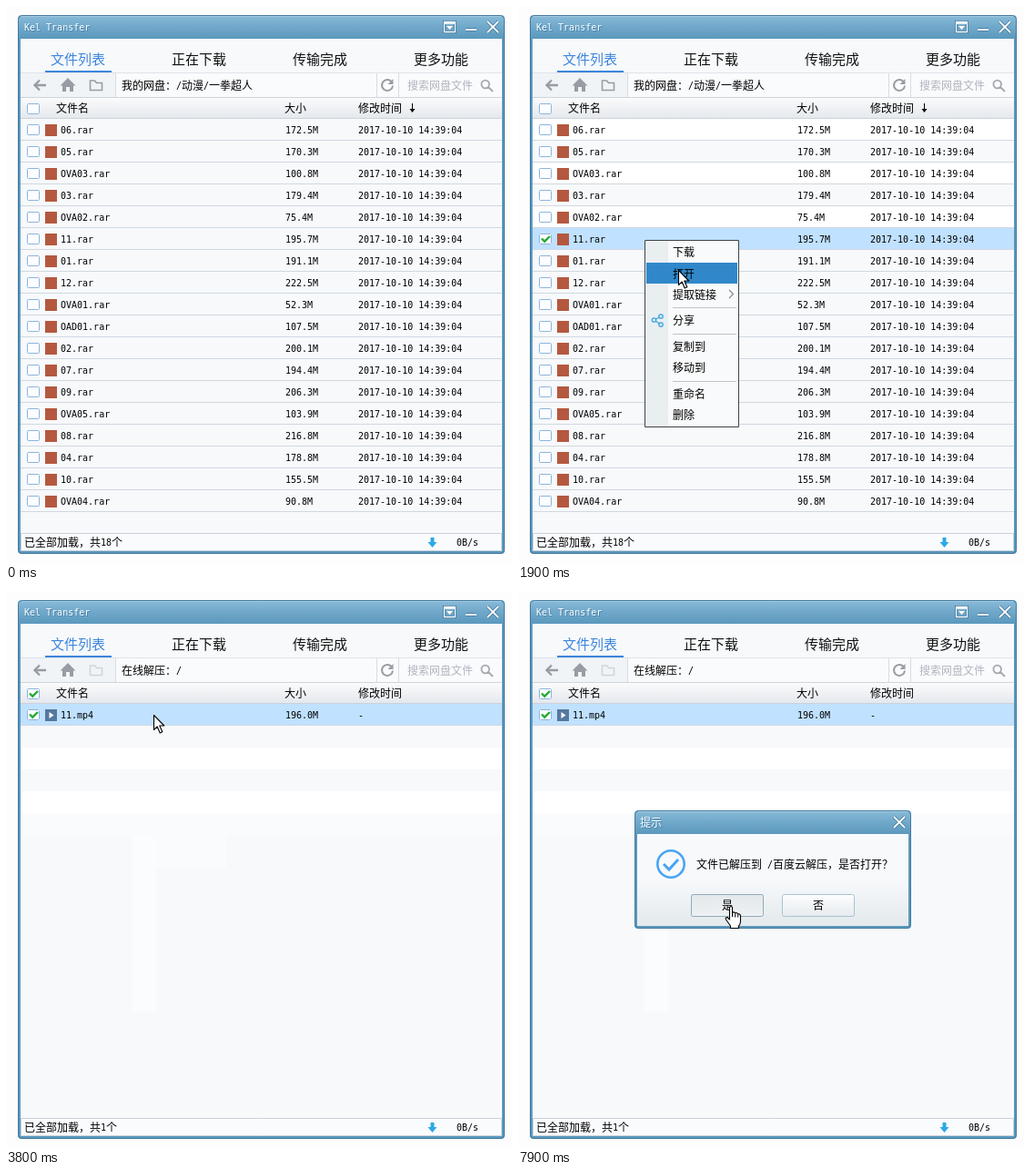
Write an HTML page with a canvas that moves like this. It is 556 px wide and 612 px high and loops after 8 s.

```html
<!DOCTYPE html>
<html lang="zh-CN">
<head>
<meta charset="utf-8">
<title>Kel Transfer</title>
<style>
html, body { margin: 0; width: 100%; height: 100%; overflow: hidden; background: #fdfdfd; }
canvas { display: block; }
</style>
</head>
<body>
<canvas id="stage" width="556" height="612"></canvas>
<script>
const ctx = document.getElementById('stage').getContext('2d');
const LOOP = 8000, STEP = 100;
const ROW_TOP = 124, ROW_H = 24, PICKED = 5;
const SELECTED = '#c0e1ff', HOVER = '#dceeff', PAGE = '#f7f9fb', GREY = '#989da4', BLUE = '#3c86dc';

const files = `06 172.5,05 170.3,OVA03 100.8,03 179.4,OVA02 75.4,11 195.7,01 191.1,12 222.5,OVA01 52.3,
OAD01 107.5,02 200.1,07 194.4,09 206.3,OVA05 103.9,08 216.8,04 178.8,10 155.5,OVA04 90.8`
  .split(',').map(entry => entry.trim().split(' '));

// Pointer keys: time, x, y
const pointerKeys = [
  [200, 350, 77], [400, 289, 138], [600, 212, 178], [800, 164, 225], [1000, 139, 257], [1200, 139, 257],
  [1900, 176, 290], [2900, 176, 290], [3100, 160, 196], [3200, 156, 150], [3400, 158, 141], [3500, 158, 141],
  [3800, 162, 136], [4000, 162, 136], [4500, 219, 153], [7200, 219, 153], [7300, 221, 190], [7700, 234, 346]
];

function pointerAt(t) {
  const next = pointerKeys.findIndex(key => key[0] > t);
  if (next < 0) return pointerKeys.at(-1).slice(1);
  if (next === 0) return [-50, -50];
  const [t0, x0, y0] = pointerKeys[next - 1], [t1, x1, y1] = pointerKeys[next];
  const k = (t - t0) / (t1 - t0);
  return [Math.round(x0 + (x1 - x0) * k), Math.round(y0 + (y1 - y0) * k)];
}

function rect(x, y, w, h, fill) {
  ctx.fillStyle = fill;
  ctx.fillRect(x, y, w, h);
}

function frame(x, y, w, h, color, radius = 0) {
  ctx.strokeStyle = color;
  ctx.lineWidth = 1;
  ctx.beginPath();
  ctx.roundRect(x + .5, y + .5, w - 1, h - 1, radius);
  ctx.stroke();
}

function vertical(y0, y1, ...colors) {
  const gradient = ctx.createLinearGradient(0, y0, 0, y1);
  colors.forEach((color, i) => gradient.addColorStop(i / (colors.length - 1), color));
  return gradient;
}

function stroke(d, color, width = 1) {
  ctx.strokeStyle = color;
  ctx.lineWidth = width;
  ctx.stroke(new Path2D(d));
}

function fill(d, color) {
  ctx.fillStyle = color;
  ctx.fill(new Path2D(d));
}

// Latin runs take half the width of a Chinese character
function text(str, x, centerY, color = '#000', size = 12) {
  ctx.fillStyle = color;
  for (const run of str.match(/[\x00-\x7f]+|[^\x00-\x7f]+/g)) {
    const latin = run.charCodeAt(0) < 128;
    ctx.font = latin
      ? '10px "DejaVu Sans Mono", monospace'
      : `${size}px "Noto Sans CJK SC", "Noto Sans CJK", sans-serif`;
    ctx.fillText(run, x, centerY + (latin ? 4 : Math.round(size * .38)));
    x += ctx.measureText(run).width;
  }
}

function titleText(str, x, y) {
  text(str, x + 1, y + 1, '#4682a8');
  text(str, x, y, '#fff');
}

function titleIcon(d) {
  stroke(d, '#40779c', 3.4);
  stroke(d, '#fff', 1.8);
}

const cross = (x, y) => `M${x - 6} ${y - 6}l12 12m0 -12l-12 12`;

function windowFrame(x, y, w, h, body) {
  ctx.fillStyle = vertical(y, y + 26, '#8abbd9', '#70a8ca', '#5b98bd');
  ctx.beginPath();
  ctx.roundRect(x, y, w, h, 4);
  ctx.fill();
  frame(x, y, w, h, '#42799d', 4);
  rect(x + 4, y + 1, w - 8, 1, '#a5cde5');
  rect(x + 3, y + 26, w - 6, h - 29, body);
}

function checkbox(y, checked) {
  rect(23, y - 6, 14, 12, '#fbfdff');
  frame(23, y - 6, 14, 12, '#8db4dc', 1);
  if (checked) stroke(`M26 ${y - .5}l3.2 3.2l5.8 -5.7`, '#27ab35', 2.4);
}

function drawWindow(state) {
  rect(0, 0, 556, 612, '#fdfdfd');
  windowFrame(13, 10, 535, 592, PAGE);
  titleText('Kel Transfer', 20, 23);
  titleIcon('M505 26h12');
  titleIcon(cross(535, 23));
  stroke('M481.5 17.5h12v11h-12z', '#40779c', 3);
  stroke('M481.5 17.5h12v11h-12zM482 19h11', '#fff', 1.3);
  fill('M484 22h7l-3.5 4z', '#fff');

  ['文件列表', '正在下载', '传输完成', '更多功能'].forEach((label, i) =>
    text(label, 49 + 133 * i, 58, i ? '#111' : BLUE, 15));

  rect(16, 73, 529, 28, '#f1f4f7');
  rect(121, 74, 424, 26, '#fafbfd');
  rect(16, 73, 529, 1, '#dfe4e9');
  rect(43, 71, 73, 2, BLUE);
  for (const x of [120, 407, 431]) rect(x, 74, 1, 26, '#d8dde3');
  stroke('M37 81.5l-5.5 5.5l5.5 5.5M32 87h12', GREY, 2.4);
  fill('M59.5 87.5l8.5-8.5l8.5 8.5h-2.5v6.5h-4v-5h-4v5h-4v-6.5z', GREY);
  stroke('M92.5 83v9.5h13v-8h-6l-2-2.5h-5z', state.archive ? '#ced6d8' : GREY, 1.6);
  text(state.archive ? '在线解压：/' : '我的网盘：/动漫/一拳超人', 127, 87);
  stroke('M423.5 83a6 6 0 1 0 1.5 4.5', GREY, 2);
  fill('M425.5 80v6h-6z', GREY);
  text('搜索网盘文件', 441, 87, '#b0b5bd');
  stroke('M531 86a4.3 4.3 0 1 1-8.6 0a4.3 4.3 0 1 1 8.6 0M530 89l5 5', '#a4a9b0', 1.8);

  rect(16, 100, 529, 1, '#cfd5dc');
  rect(16, 101, 529, 22, vertical(101, 123, '#fafbfc', '#e5e8ed'));
  rect(16, 123, 529, 1, '#cbd3dc');
  checkbox(113, state.allChecked);
  text('文件名', 55, 112);
  text('大小', 306, 112);
  text('修改时间', 387, 112);
  if (!state.archive) {
    stroke('M446.5 107v9', '#000');
    fill('M443.5 113h6l-3 4z', '#000');
  }

  rect(16, 579, 529, 20, '#fafbfd');
  frame(16, 579, 529, 20, '#c9d2da');
  text(state.status, 20, 589);
  fill('M466.5 584h4v5h3l-5 6l-5-6h3z', '#2ba8e6');
  text('0B/s', 495, 589);
}

function drawRow(i, name, size, date, back, checked, video) {
  const y = ROW_TOP + ROW_H * i, mid = y + 12;
  rect(16, y, 529, ROW_H - 1, back);
  rect(16, y + ROW_H - 1, 529, 1, '#d0d8e1');
  checkbox(mid, checked);
  rect(43, mid - 6, 13, 13, video ? '#56789f' : '#b4583f');
  if (video) fill(`M47.5 ${mid - 3}v7l5-3.5z`, '#fff');
  text(name, 60, mid);
  text(size, 307, mid);
  text(date, 387, mid);
}

function drawFileList(t, hovered) {
  files.forEach(([name, size], i) => {
    let back = i % 2 === 0 && i < hovered ? '#fff' : PAGE;
    if (i === hovered) back = t >= 1000 ? SELECTED : HOVER;
    drawRow(i, name + '.rar', size + 'M', '2017-10-10 14:39:04', back, i === PICKED && t >= 1100);
  });
}

function drawMenu(pointerY) {
  rect(139, 257, 104, 206, '#f9fafb');
  rect(140, 258, 25, 204, '#e9eef1');
  frame(139, 257, 104, 206, '#3e4348');
  if (pointerY >= 259) rect(141, pointerY < 282 ? 259 : 282, 100, 23, '#3088ca');
  const items = { 下载: 270, 打开: 294, 提取链接: 317, 分享: 345, 复制到: 374, 移动到: 397, 重命名: 426, 删除: 449 };
  for (const label in items) text(label, 170, items[label]);
  for (const y of [331, 360, 412]) rect(170, y, 70, 1, '#bfc3c6');
  stroke('M232 312l4.5 4.5l-4.5 4.5', '#888', 1.2);
  stroke('M157 341l-7.5 4l7.5 5', '#3ba4dc', 1.3);
  for (const [x, y] of [[157, 341], [149.5, 345], [157, 350]]) {
    ctx.beginPath();
    ctx.arc(x, y, 2.2, 0, 7);
    ctx.fillStyle = '#dff1fb';
    ctx.fill();
    ctx.stroke();
  }
}

// Faint bands that stay behind after the list is cleared
function drawTraces() {
  rect(16, 172, 529, 24, '#fff');
  rect(16, 220, 529, 24, '#fff');
  rect(16, 244, 529, 24, '#fafbfc');
  rect(139, 268, 26, 194, '#fbfcfd');
  rect(165, 268, 78, 37, '#fafbfd');
}

function drawSpinner(t) {
  for (let i = 0; i < 8; i++) {
    const angle = i * Math.PI / 4 + t / STEP * Math.PI / 4;
    ctx.fillStyle = `rgba(70, 150, 215, ${(i + 1) / 8})`;
    ctx.beginPath();
    ctx.arc(283 + 7 * Math.cos(angle), 337 + 7 * Math.sin(angle), 2, 0, 7);
    ctx.fill();
  }
}

function drawButton(label, x, level = 0) {
  const shades = [['#fdfefe', '#e6ebee'], ['#ffffff', '#dfeaf1'], ['#e3e8eb', '#eef1f3']][level];
  ctx.fillStyle = vertical(333, 358, ...shades);
  ctx.beginPath();
  ctx.roundRect(x, 333, 80, 25, 2);
  ctx.fill();
  frame(x, 333, 80, 25, level ? '#8fabbb' : '#a8c3d3', 2);
  text(label, x + 40 - 6 * label.length, 345);
}

function drawDialog(x, w, title, message, mark) {
  windowFrame(x, 241, w, 130, vertical(267, 368, PAGE, '#f7f9fb', '#e3e9ec'));
  titleText(title, x + 6, 254);
  titleIcon(cross(x + w - 13, 254));
  const iconX = x + 40;
  stroke(`M${iconX + 14.7} 300a14.7 14.7 0 1 1-29.4 0a14.7 14.7 0 1 1 29.4 0`, '#48a4f2', 2.6);
  stroke(`M${iconX} 300${mark}`, '#48a4f2', 3);
  text(message, x + 68, 300);
}

function drawDialogs(t, pointerY) {
  if (t < 7000) {
    drawDialog(155, 250, '请稍候', '正在解压文件...', 'm0 -9v3.5m-4 3.5h4v10m-4 0h8');
    drawButton('取消', 240);
  } else {
    drawDialog(128, 304, '提示', '文件已解压到 /百度云解压，是否打开？', 'm-8 0l6 6l10 -11');
    drawButton('是', 190, t >= 7900 ? 2 : pointerY >= 334 ? 1 : 0);
    drawButton('否', 290);
  }
}

function drawPointer(x, y) {
  const arrow = 'M.5 .5v16l3.7-3.5l3 7l2.6-1.2l-3-6.8h5z';
  const hand = 'M-1.5 1.5q1.5-2 3 0v6q2-1.5 3.2.5q2-1 3 1q2.5-.5 2.8 2v6q0 3-2 5v2.5h-9v-2.5l-5-7q-1-2.5 1.5-2.5l2.5 2.5z';
  ctx.save();
  ctx.translate(x, y);
  ctx.lineJoin = 'round';
  const shape = y >= 334 ? hand : arrow;
  fill(shape, '#fff');
  stroke(shape, '#000', 1.1);
  if (shape === hand) stroke('M1.5 7v5M4.7 8.5v4M7.7 9.5v3', '#000');
  ctx.restore();
}

function draw(t) {
  const [px, py] = pointerAt(t);
  const archive = t >= 2200, loaded = t >= 2600, checked = t >= 3600;
  const status = !archive ? '已全部加载，共18个' : loaded ? '已全部加载，共1个' : '正在加载...';
  drawWindow({ archive, status, allChecked: checked });
  if (!archive) {
    drawFileList(t, Math.min(PICKED, Math.floor((py - ROW_TOP) / ROW_H)));
    if (t >= 1100) drawMenu(py);
  } else {
    drawTraces();
    if (loaded) {
      const back = checked ? SELECTED : py < ROW_TOP + ROW_H ? HOVER : '#fff';
      drawRow(0, '11.mp4', '196.0M', '-', back, checked, true);
    } else drawSpinner(t);
  }
  if (t >= 4700) drawDialogs(t, py);
  drawPointer(px, py);
}

function tick() {
  draw(Math.floor(performance.now() % LOOP / STEP) * STEP);
  requestAnimationFrame(tick);
}
tick();
</script>
</body>
</html>
```
